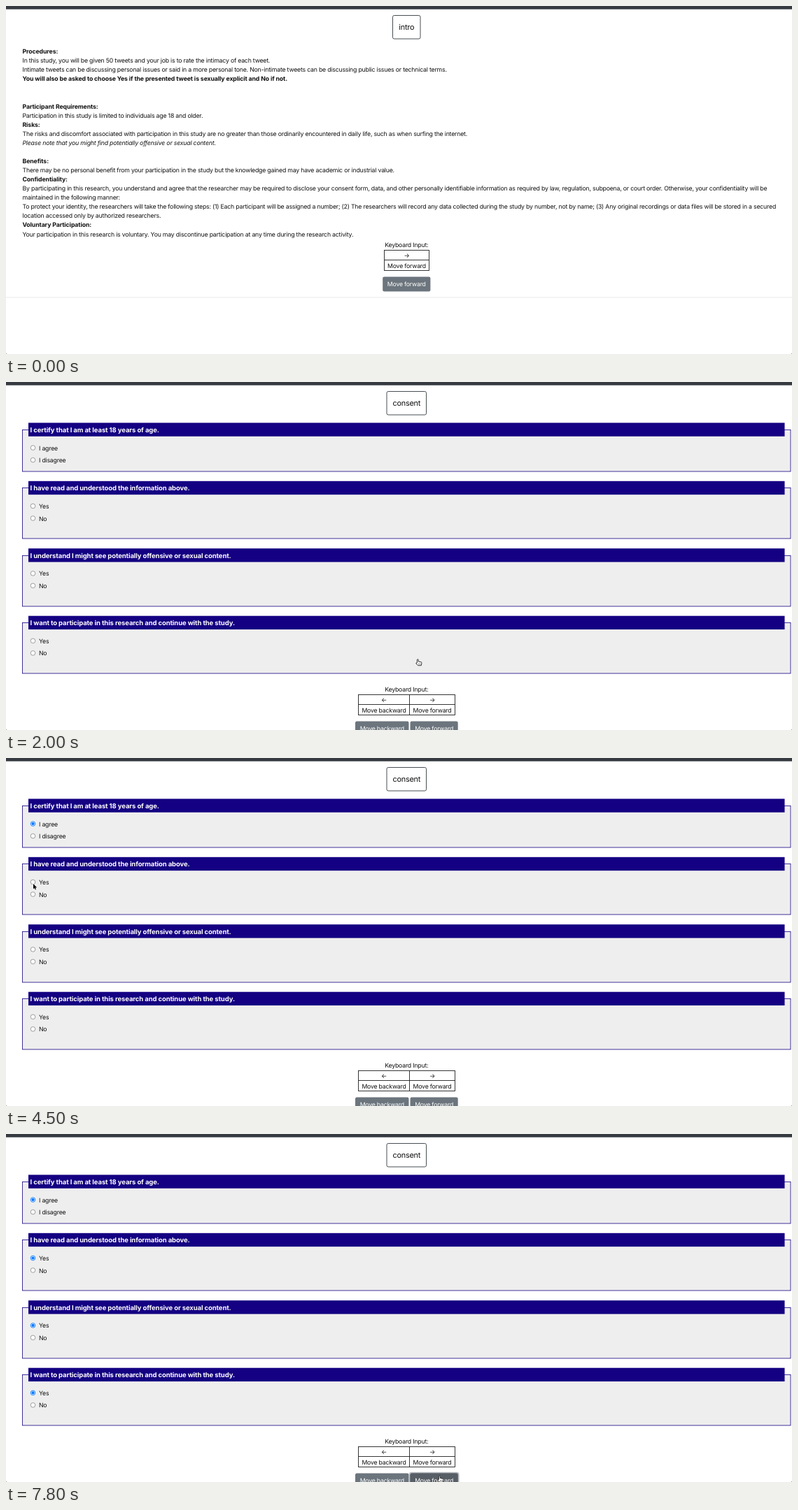
Write an HTML page with a canvas that moves like this. It is 1123 px wide and 498 px high and loops after 8 s.

```html
<!DOCTYPE html>
<html lang="en">
<head>
<meta charset="utf-8">
<title>Study consent</title>
<style>
  html, body { margin: 0; width: 100%; height: 100%; overflow: hidden; background: #fff; }
  canvas { display: block; }
</style>
</head>
<body>
<canvas id="stage" width="1123" height="498"></canvas>
<script>
const ctx = document.getElementById('stage').getContext('2d');
const LOOP = 8000, STEP = 100;
const BODY = 8.71, LINE = 13.07;
const INK = '#111', NAVY = '#140082', GREY = '#6c757d', GREY_DARK = '#585e66', BLUE = '#0075ff';

const INTRO = [
  '*Procedures:',
  'In this study, you will be given 50 tweets and your job is to rate the intimacy of each tweet.',
  'Intimate tweets can be discussing personal issues or said in a more personal tone. Non-intimate tweets can be discussing public issues or technical terms.',
  '*You will also be asked to choose Yes if the presented tweet is sexually explicit and No if not.',
  '', '',
  '*Participant Requirements:',
  'Participation in this study is limited to individuals age 18 and older.',
  '*Risks:',
  'The risks and discomfort associated with participation in this study are no greater than those ordinarily encountered in daily life, such as when surfing the internet.',
  '/Please note that you might find potentially offensive or sexual content.',
  '',
  '*Benefits:',
  'There may be no personal benefit from your participation in the study but the knowledge gained may have academic or industrial value.',
  '*Confidentiality:',
  'By participating in this research, you understand and agree that the researcher may be required to disclose your consent form, data, and other personally identifiable information as required by law, regulation, subpoena, or court order. Otherwise, your confidentiality will be',
  'maintained in the following manner:',
  'To protect your identity, the researchers will take the following steps: (1) Each participant will be assigned a number; (2) The researchers will record any data collected during the study by number, not by name; (3) Any original recordings or data files will be stored in a secured',
  'location accessed only by authorized researchers.',
  '*Voluntary Participation:',
  'Your participation in this research is voluntary. You may discontinue participation at any time during the research activity.'
];

// checked: time at which the first option is picked
const QUESTIONS = [
  { top: 58.4, height: 60, options: ['I agree', 'I disagree'], checked: 3700,
    title: 'I certify that I am at least 18 years of age.' },
  { top: 141.8, height: 73, options: ['Yes', 'No'], checked: 4800,
    title: 'I have read and understood the information above.' },
  { top: 238.2, height: 73, options: ['Yes', 'No'], checked: 5800,
    title: 'I understand I might see potentially offensive or sexual content.' },
  { top: 334.7, height: 73, options: ['Yes', 'No'], checked: 6700,
    title: 'I want to participate in this research and continue with the study.' }
];

// Pointer trips as [time, x, y]; the pointer is off stage between trips.
const TRIPS = [
  [[200, 577, 490], [500, 572, 420], [700, 569, 400], [800, 569, 400], [900, 566, 392],
   [1000, 582, 391], [1100, 582, 391], [1300, 588.5, 397], [2300, 588.5, 397],
   [2500, 430, 260], [2700, 110, 75], [2800, 38, 49], [2900, 60, 90], [3200, 172, 336],
   [3300, 150, 290], [3400, 70, 150], [3500, 28, 83], [3600, 37.5, 92.5], [3800, 37.5, 92.5],
   [4100, 37.5, 167], [4500, 39, 180], [4600, 38, 177], [5000, 38, 177], [5300, 42, 225],
   [5600, 38, 273.5], [5900, 38, 273.5], [6100, 40, 325], [6300, 38, 373], [6600, 38, 371.5],
   [6700, 49, 379]],
  [[7300, 612, 492], [7500, 617, 490], [7700, 619.5, 489.5], [8000, 619.5, 489.5]]
];

function text(str, x, y, { size = BODY, weight = 400, style = 'normal', color = INK, align = 'left' } = {}) {
  const tracking = weight > 400 ? -0.0115 : -0.022;
  ctx.font = `${style} ${weight} ${size}px Inter, "Open Sans", sans-serif`;
  ctx.letterSpacing = `${size * tracking}px`;
  ctx.textRendering = 'geometricPrecision';
  ctx.textAlign = align;
  ctx.fillStyle = color;
  ctx.fillText(str, x, y + size * 0.36);
}

const centered = (str, x, y, opts) => text(str, x, y, { align: 'center', ...opts });

function fill(x, y, w, h, color) {
  ctx.fillStyle = color;
  ctx.fillRect(x, y, w, h);
}

function rounded(x, y, w, h, r, color, line) {
  ctx.beginPath();
  ctx.roundRect(x, y, w, h, r);
  if (color) { ctx.fillStyle = color; ctx.fill(); }
  if (line) { ctx.strokeStyle = line; ctx.lineWidth = 0.9; ctx.stroke(); }
}

function button(label, x, y, w, { hover = 0, focus = false } = {}) {
  if (focus) rounded(x - 1.8, y - 1.8, w + 3.6, 24.6, 3.5, '#b8bcc2');
  rounded(x, y, w, 21, 2.2, GREY);
  if (hover) {
    ctx.globalAlpha = hover;
    rounded(x, y, w, 21, 2.2, GREY_DARK);
    ctx.globalAlpha = 1;
  }
  centered(label, x + w / 2, y + 10.5, { color: '#fff' });
}

function keyTable(y, edges, keys) {
  centered('Keyboard Input:', 572.3, y - 7.2);
  const left = edges[0], right = edges[edges.length - 1];
  ctx.strokeStyle = '#222';
  ctx.lineWidth = 0.9;
  ctx.strokeRect(left, y, right - left, 29);
  ctx.beginPath();
  ctx.moveTo(left, y + 14);
  ctx.lineTo(right, y + 14);
  for (const x of edges.slice(1, -1)) {
    ctx.moveTo(x, y);
    ctx.lineTo(x, y + 29);
  }
  ctx.stroke();
  keys.forEach(([arrow, label], i) => {
    const mid = (edges[i] + edges[i + 1]) / 2;
    centered(arrow, mid, y + 7);
    centered(label, mid, y + 21.9);
  });
}

function titleBox(label, x, w) {
  rounded(x, 13.5, w, 33.5, 2.2, '#fff', '#343a40');
  centered(label, x + w / 2, 30.5, { size: 10.89 });
}

function radio(x, y, checked) {
  ctx.beginPath();
  ctx.arc(x, y, 3.3, 0, 7);
  ctx.fillStyle = '#fff';
  ctx.fill();
  ctx.lineWidth = checked ? 0.9 : 0.7;
  ctx.strokeStyle = checked ? BLUE : '#767676';
  ctx.stroke();
  if (checked) {
    ctx.beginPath();
    ctx.arc(x, y, 2.1, 0, 7);
    ctx.fillStyle = BLUE;
    ctx.fill();
  }
}

function introPage(t) {
  titleBox('intro', 552.5, 39.5);
  INTRO.forEach((row, i) => {
    const bold = row[0] === '*', italic = row[0] === '/';
    text(bold || italic ? row.slice(1) : row, 23.5, 65 + i * LINE,
      { weight: bold ? 700 : 400, style: italic ? 'italic' : 'normal' });
  });
  keyTable(349.5, [540.5, 604.5], [['→', 'Move forward']]);
  const hover = Math.min(1, Math.max(0, (t - 1100) / 200));
  button('Move forward', 538.2, 387.4, 68.2, { hover, focus: t >= 1400 });
  fill(0, 416.5, 1123, 1, '#e9e9e9');
}

function question({ top, height, options, title, checked }, t) {
  const y = Math.round(top + 9.6) + 0.5;
  fill(23.5, y, 1097.5, height - 0.5, '#eee');
  ctx.strokeStyle = NAVY;
  ctx.lineWidth = 0.8;
  ctx.strokeRect(23.5, y, 1097.5, height - 0.5);
  fill(32, top, 1080.5, 19.4, NAVY);
  text(title, 34.6, top + 9.9, { size: 9.5, weight: 700, color: '#fff' });
  options.forEach((label, i) => {
    const cy = top + 35.7 + i * 17.5;
    radio(38.5, cy, i === 0 && t >= checked);
    text(label, 47, cy + 0.4);
  });
}

function consentPage(t) {
  titleBox('consent', 544, 56.5);
  QUESTIONS.forEach(q => question(q, t));
  keyTable(447.5, [503.5, 576.5, 641.5], [['←', 'Move backward'], ['→', 'Move forward']]);
  button('Move backward', 499, 485.6, 76.5);
  const hover = Math.min(1, Math.max(0, (t - 7200) / 200));
  button('Move forward', 577.5, 485.6, 68.2, { hover, focus: t >= 7600 });
}

const ARROW = new Path2D('M0 0V7.6L1.7 6 2.8 8.5 4 8 2.9 5.6H5.3Z');
const HAND = new Path2D('M-1.1 4.9V.7Q-1.1-.3-.2-.3 .7-.3 .7 .7V3L4.8 3.8Q5.7 4 5.4 5.4L4.7 8.7H.2L-2.6 6Q-3 4.6-1.1 4.9Z');

function pointerAt(t) {
  for (const trip of TRIPS) {
    for (let i = 0; i < trip.length; i++) {
      const [t0, x0, y0] = trip[i];
      if (t === t0) return [x0, y0];
      const next = trip[i + 1];
      if (next && t > t0 && t < next[0]) {
        const k = (t - t0) / (next[0] - t0);
        return [x0 + (next[1] - x0) * k, y0 + (next[2] - y0) * k];
      }
    }
  }
  return null;
}

function pointer(t) {
  const pos = pointerAt(t);
  if (!pos) return;
  const hand = (t >= 1200 && t < 2400) || t >= 7300;
  ctx.save();
  ctx.translate(...pos);
  ctx.lineJoin = 'round';
  if (hand) {
    ctx.fillStyle = '#fff';
    ctx.fill(HAND);
    ctx.lineWidth = 0.9;
    ctx.strokeStyle = '#222';
    ctx.stroke(HAND);
    ctx.lineWidth = 0.5;
    ctx.stroke(new Path2D('M1 5.7V7.4M2.3 5.7V7.4M3.6 5.7V7.4'));
  } else {
    ctx.lineWidth = 1.2;
    ctx.strokeStyle = '#fff';
    ctx.stroke(ARROW);
    ctx.fillStyle = '#000';
    ctx.fill(ARROW);
  }
  ctx.restore();
}

function draw(t) {
  fill(0, 0, 1123, 498, '#fff');
  fill(0, 0, 1123, 4.7, '#343a40');
  (t < 2000 ? introPage : consentPage)(t);
  fill(0, 497, 1, 1, '#999');
  fill(1122, 497, 1, 1, '#999');
  pointer(t);
}

const start = performance.now();
function tick() {
  const t = (performance.now() - start) % LOOP;
  draw(Math.floor(t / STEP) * STEP);
  requestAnimationFrame(tick);
}
tick();
</script>
</body>
</html>
```
